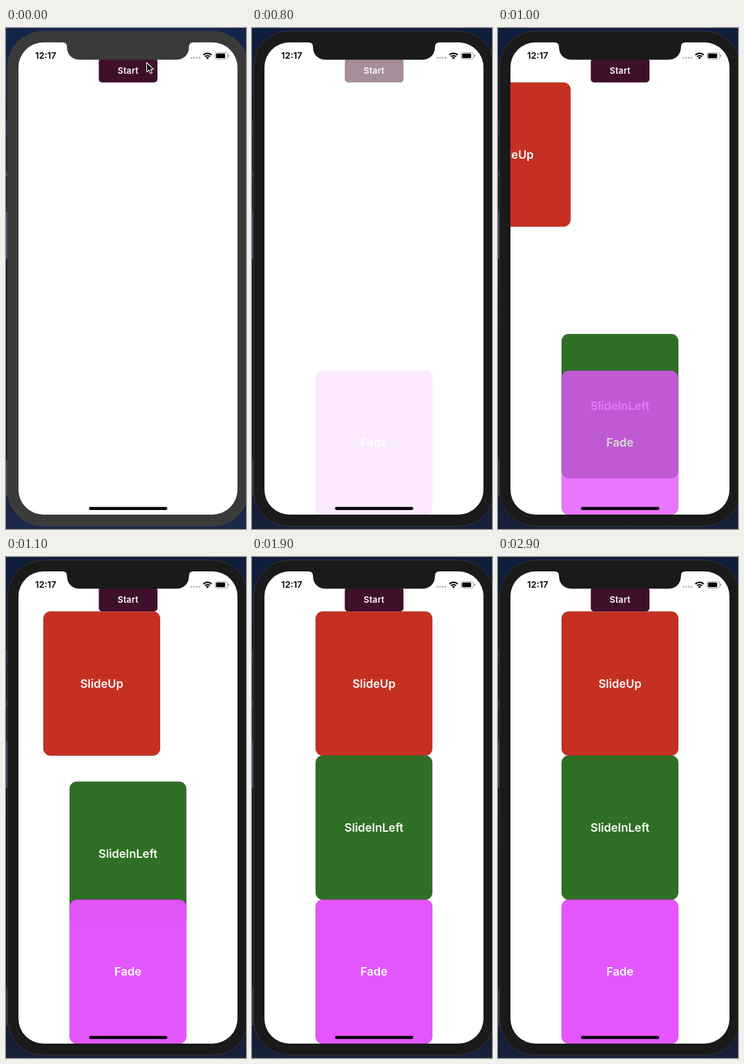
An HTML page for the animation above (3000 ms loop, 366x766 px).

```html
<!DOCTYPE html>
<html lang="en">
<head>
<meta charset="utf-8">
<title>Entrance animations</title>
<style>
html, body { margin: 0; width: 100%; height: 100%; overflow: hidden; background: #13203c; }
svg { display: block; width: 366px; height: 766px; }
text { font-family: Inter, "Open Sans", sans-serif; font-weight: 600; text-anchor: middle; }

.card rect { width: 178px; height: 220.5px; rx: 11px; stroke: #000; stroke-opacity: .35; stroke-width: .5px; }
.card text { font-size: 17.5px; fill: #fff; }

#body, #shade, #cursor, #btn, .card { animation: 3s infinite both; }
#body { animation-name: body; animation-timing-function: step-end; }
#shade { animation-name: shade; animation-timing-function: step-end; }
#cursor { animation-name: cursor; animation-timing-function: step-end; }
#btn { animation-name: press; animation-timing-function: ease-in-out; }
#left { animation-name: fromLeft; animation-timing-function: ease-in-out; }
#up { animation-name: fromBelow; animation-timing-function: ease-in-out; }
#fade { animation-name: fadeIn; animation-timing-function: ease-in-out; }

@keyframes body {
  0% { fill: #3a3a3a; stroke: #3f3f41; }
  20%, 100% { fill: #1a1a1a; stroke: #35353a; }
}
@keyframes shade {
  0% { opacity: 0; }
  20%, 100% { opacity: .2; }
}
@keyframes cursor {
  0% { transform: translate(214px, 52px); }
  3.333% { transform: translate(211px, 56px); }
  6.667% { transform: translate(209px, 58px); }
  13.333% { transform: translate(208px, 59px); }
  16.667% { transform: translate(207px, 60px); opacity: 1; }
  23.333%, 100% { transform: translate(207px, 60px); opacity: 0; }
}
@keyframes press {
  0%, 18.333% { opacity: 1; }
  23.333% { opacity: .2; }
  31.667%, 100% { opacity: 1; }
}
@keyframes fromLeft {
  0%, 23.333% { transform: translateX(-500px); }
  40%, 100% { transform: none; }
}
@keyframes fromBelow {
  0%, 23.333% { transform: translateY(500px); }
  40%, 100% { transform: none; }
}
@keyframes fadeIn {
  0%, 23% { opacity: 0; }
  38%, 100% { opacity: 1; }
}
</style>
</head>
<body>
<svg viewBox="0 0 366 766">
  <defs>
    <clipPath id="screen"><rect x="19" y="22" width="334" height="722" rx="38"/></clipPath>
    <linearGradient id="desk" x2="0" y2="1">
      <stop offset="0" stop-color="#13264a"/>
      <stop offset=".5" stop-color="#10192f"/>
      <stop offset=".85" stop-color="#0f1830"/>
      <stop offset="1" stop-color="#1e2a4a"/>
    </linearGradient>
  </defs>

  <!-- desktop behind the device -->
  <rect width="366" height="766" fill="url(#desk)"/>
  <rect y="110" width="4" height="30" fill="#1b1e28"/>
  <rect y="140" width="4" height="1.5" fill="#050608"/>
  <rect y="141.500" width="4" height="24" fill="#2a3354"/>
  <rect y="165" width="4" height="55" fill="#262629"/>
  <rect y="220" width="4" height="7" fill="#484c5a"/>
  <rect y="227" width="4" height="54" fill="#2a2a2c"/>
  <rect y="281" width="4" height="72" fill="#4b587a"/>
  <rect y="660" width="4" height="56" fill="#3c465a"/>
  <rect id="shade" width="366" height="766"/>

  <rect id="body" x="2.500" y="5" width="367" height="756.500" rx="54" stroke-width="1"/>

  <g clip-path="url(#screen)">
    <rect x="19" y="22" width="334" height="722" fill="#fff"/>

    <g id="btn">
      <rect x="141.500" y="46" width="89.500" height="37.300" rx="5" fill="#3f102b"/>
      <text x="186.200" y="70" font-size="13" letter-spacing=".3" fill="#fff">Start</text>
    </g>

    <g id="left" class="card">
      <rect x="97" y="83.200" fill="#c53022"/>
      <text x="186" y="200">SlideUp</text>
    </g>
    <g id="up" class="card">
      <rect x="97" y="303.500" fill="#307026"/>
      <text x="186" y="420">SlideInLeft</text>
    </g>
    <g id="fade" class="card">
      <rect x="97" y="523.700" fill="#e455ff"/>
      <text x="186" y="640.300">Fade</text>
    </g>

    <rect x="126.500" y="732.300" width="119.500" height="4.600" rx="2.300" fill="#08040a"/>
  </g>

  <!-- notch -->
  <use href="#notch" style="fill:#3a3a3a"/>
  <path id="notchShape" style="animation:body 3s step-end infinite;stroke-width:0"
    d="M86 21V22Q93 22 93 29C93 41 101 48.500 113 48.500H259C271 48.500 279 41 279 29Q279 22 286 22V21Z"/>

  <!-- status bar -->
  <text x="60.500" y="47.300" font-size="13.500">12:17</text>
  <g fill="#b9b9b9">
    <circle cx="282.500" cy="45.500" r="1.500"/>
    <circle cx="286.700" cy="45.500" r="1.500"/>
    <circle cx="290.900" cy="45.500" r="1.500"/>
    <circle cx="295.100" cy="45.500" r="1.500"/>
  </g>
  <g fill="none" stroke="#000" stroke-width="2.100">
    <path d="M301 41.300A8.800 8.800 0 0 1 313.600 41.300"/>
    <path d="M303.500 43.900A5.200 5.200 0 0 1 311.100 43.900"/>
  </g>
  <path d="M307.300 47.700L305 45.400A3.300 3.300 0 0 1 309.600 45.400Z"/>
  <rect x="318.800" y="37.600" width="19.200" height="9.800" rx="2.800" fill="none" stroke="#8c8c8c" stroke-width=".9"/>
  <rect x="320.300" y="39.100" width="13.900" height="6.800" rx="1.500"/>
  <path d="M339 40.700Q340.600 41.200 340.600 42.500T339 44.300Z" fill="#8c8c8c"/>

  <path id="cursor" d="M.5 1V15.300L3.800 12.200L6.100 17.400L8.900 16.200L6.600 11.200H11Z"
    fill="#0a0a0a" stroke="#fff" stroke-width="1.100" stroke-linejoin="round"/>
</svg>
</body>
</html>
```
